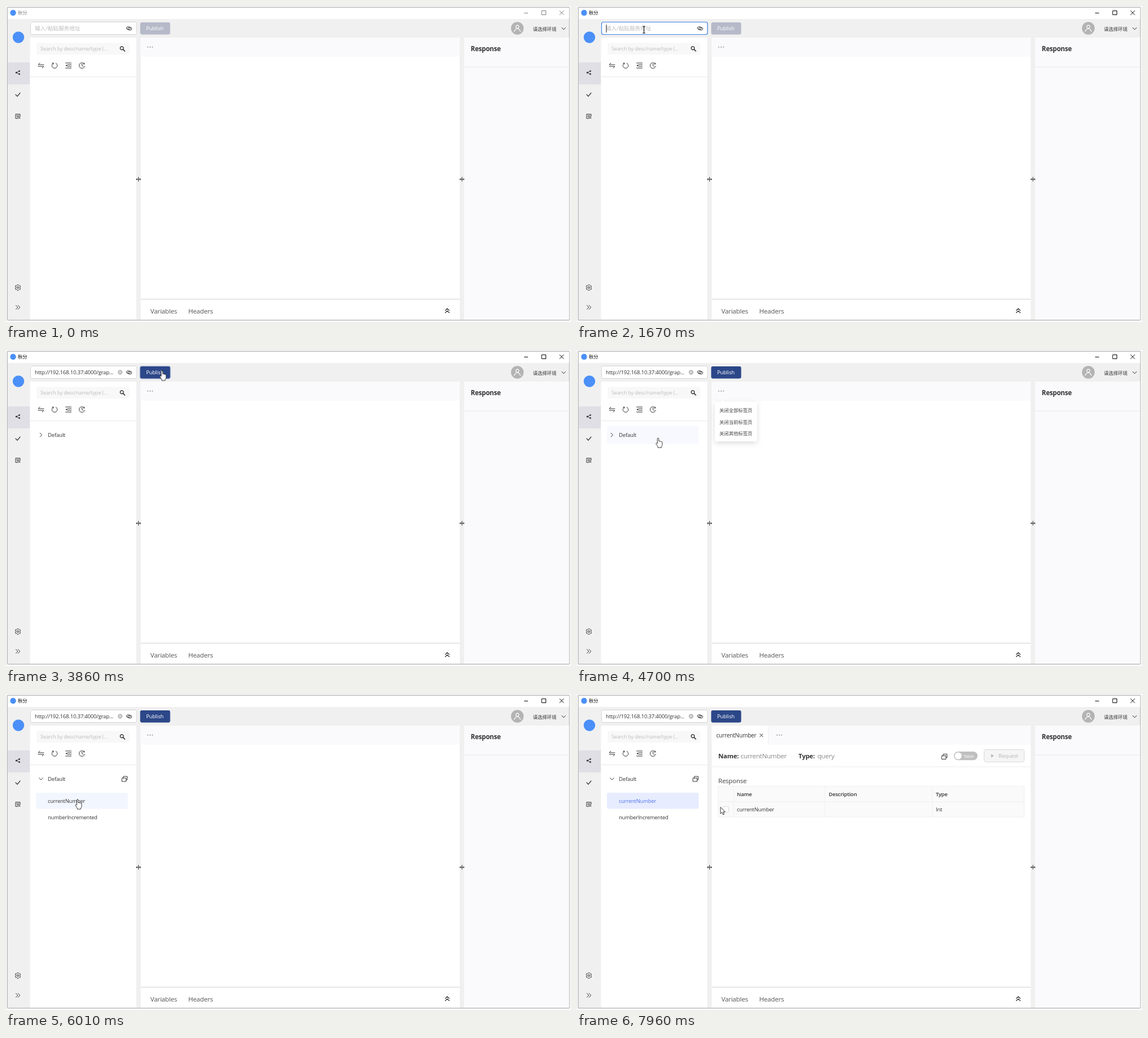
Recreate the animation shown at these times as an HTML page. Size 1000 px wide and 560 px high, loop 8000 ms.

```html
<!DOCTYPE html>
<html lang="zh-CN">
<head>
<meta charset="utf-8">
<style>
html, body { margin: 0; width: 100%; height: 100%; overflow: hidden; background: #fff; }
svg { display: block; width: 100%; height: 100%; }
text { font-family: "Open Sans", "Noto Sans CJK SC", "Noto Sans CJK", sans-serif; letter-spacing: -.02em; white-space: pre; }
.cn { letter-spacing: 0; }
.line { fill: none; stroke: #333; stroke-width: 1; stroke-linecap: round; stroke-linejoin: round; }
</style>
</head>
<body>
<svg id="stage" viewBox="0 0 1000 560"></svg>
<script>
const LOOP = 8000;
const rect = (x, y, w, h, fill, more = '') =>
  `<rect x="${x}" y="${y}" width="${w}" height="${h}" fill="${fill}" ${more}/>`;
const text = (x, mid, size, str, fill = '#333', more = '') =>
  `<text x="${x}" y="${mid + size * .36}" font-size="${size}" fill="${fill}" ${more}>${str}</text>`;
const line = (d, more = '') => `<path class="line" d="${d}" ${more}/>`;
const disc = (x, y, r, fill, more = '') => `<circle cx="${x}" cy="${y}" r="${r}" fill="${fill}" ${more}/>`;
const at = (x, y, body, id = '') => `<g ${id && `id="${id}"`} transform="translate(${x} ${y})">${body}</g>`;
const group = (id, body) => `<g id="${id}">${body}</g>`;
const CN = 'class="cn"';

const copyIcon = line('M-4.5 -1.5h7v6h-7zM-2.5 -1.5v-3h7v6h-2');
const dots = [-4, 0, 4].map(x => disc(x, 0, .75, '#444')).join('');
const grip = at(0, 0, line('M-3.5 0H3.5M0 -3.5V3.5', 'style="stroke:#555;stroke-width:1.3"') +
  '<path d="M-4.5 0l2 -2v4zM4.5 0l-2 -2v4z" fill="#555"/>');

function frame() {
  return rect(2.5, 2.5, 994.5, 554, '#f0f0f0', 'stroke="#b5b5b5" filter="url(#soft)"') +
    rect(3, 3, 993.5, 20, '#fff') +
    rect(3, 100, 39.5, 39, '#e0dfe6') +
    rect(42.5, 56, 188, 500, '#fff') +
    rect(238.5, 56, 564.5, 500, '#fff') +
    rect(238.5, 56, 564.5, 34, '#fafafc') +
    rect(811, 56, 185.5, 500, '#fafafc') +
    rect(811, 107.5, 185.5, 1, '#e9e9ed') +
    rect(42.5, 125, 188, 1, '#e8e8e8') +
    rect(238.5, 519, 564.5, 1, '#d2d2d2');
}

function titleBar() {
  return disc(12.5, 12, 5.2, '#4a90f8') +
    group('title', text(21, 12, 8.3, '秋分', '#000', CN) +
      line('M917.5 12.5h6M948.5 8.5h7v7h-7zM980 8.5l7 7M987 8.5l-7 7', 'style="stroke:#000"'));
}

function sidebar() {
  return disc(22, 55.5, 10.2, '#4a90f8') +
    at(21, 118, line('M-2.5 0L2.5 -2.7M-2.5 0L2.5 2.7') +
      disc(-2.7, 0, 1.5, '#333') + disc(2.6, -2.7, 1.4, '#333') + disc(2.6, 2.7, 1.4, '#333')) +
    at(21, 157, line('M-4 0l3 3l5 -6', 'style="stroke-width:1.2"')) +
    at(21, 195.5, line('M0 3.8h-4v-7.6h8v4M-2 -1.5h4M-2 .8h2M4 4l-1.2 -1.2') +
      disc(1.8, 1.8, 1.5, 'none', 'stroke="#333"')) +
    at(21, 499, line('M-2.2 -3.5L-1 -4.8H1L2.2 -3.5L4.2 -3V-1.2L3.6 0L4.2 1.2V3L2.2 3.5L1 4.8H-1L-2.2 3.5L-4.2 3V1.2L-3.6 0L-4.2 -1.2V-3Z') +
      disc(0, 0, 1.6, 'none', 'stroke="#333"')) +
    at(21, 534, line('M-3.5 -3.5l3.5 3.5l-3.5 3.5M.3 -3.5l3.5 3.5l-3.5 3.5'));
}

function topBar() {
  return rect(43.5, 28.5, 187.5, 22, '#fff', 'id="box" rx="3" stroke="#d6d6d6"') +
    rect(43.5, 28.5, 187.5, 22, 'none', 'id="boxOn" rx="3" stroke="#3d82ea" stroke-width="1.2"') +
    text(51, 39.5, 9.6, '输入/粘贴服务地址', '#bdbdbd', CN + ' id="hint"') +
    group('urlShort', text(51, 39.5, 9.5, 'http://192.168.10.37:4000/grap...')) +
    `<g id="urlLong" clip-path="url(#field)">${text(193.5, 39.5, 9.5, 'http://192.168.10.37:4000/graphql', '#333', 'text-anchor="end"')}</g>` +
    group('clear', disc(202, 39.5, 4.2, '#bcbcbc') +
      line('M200.5 38l3 3M203.5 38l-3 3', 'style="stroke:#fff;stroke-width:.9"')) +
    rect(51.5, 33, 1, 14, '#222', 'id="caret"') +
    at(217.8, 39.5, rect(-4.7, -2.6, 7, 4.4, 'none', 'rx="2.2" stroke="#333"') +
      rect(-2.2, -1.3, 7, 4.4, 'none', 'rx="2.2" stroke="#333"')) +
    rect(237.5, 29, 53, 21.5, 'none', 'id="wave" rx="3" stroke="#3a5bb5"') +
    rect(237.5, 29, 53, 21.5, '#b5b9c8', 'rx="3"') +
    rect(237.5, 29, 53, 21.5, '#2c4789', 'id="publish" rx="3"') +
    text(248, 39.5, 9.4, 'Publish', '#fff') +
    disc(905, 39.5, 11.2, '#b3b3b3') +
    disc(905, 36.8, 2.7, 'none', 'stroke="#fff" stroke-width="1.1"') +
    line('M899.7 45.5a5.3 5 0 0 1 10.6 0', 'style="stroke:#fff;stroke-width:1.1"') +
    text(932.5, 40.5, 8.4, '请选择环境', '#333', CN) +
    line('M983.7 38.3l3.3 3.6l3.3 -3.6');
}

function tree() {
  return rect(54, 65.5, 164.5, 20.5, '#f8f8f8', 'rx="3"') +
    text(61, 75.7, 9.05, 'Search by desc/name/type (...', '#bdbdbd') +
    at(205, 75, disc(0, -.3, 2.9, 'none', 'stroke="#222" stroke-width="1.2"') +
      line('M2.3 2l3 3', 'style="stroke:#222;stroke-width:1.5"')) +
    at(62, 105.5, line('M5 -1.5H-5l3 -3M-5 1.5H5l-3 3')) +
    at(86, 105.5, line('M-2.2 -4.3a4.8 4.8 0 1 0 4.4 0M-2.2 -4.3v2M-2.2 -4.3h-2')) +
    at(110.5, 105.5, line('M-5 -4.5H5M-1 -1.5H5M-1 1.5H5M-5 4.5H5') +
      '<path d="M-5 0l3 -2v4z" fill="#333"/>') +
    at(134.5, 105.5, line('M4 -3a5 5 0 1 0 .8 4.3M0 -3v3.2l2.3 1.3M4.3 -4.5v2h-2')) +
    rect(53, 134.5, 162.5, 32, '#f8f9fe', 'id="rootBg" rx="3"') +
    group('root', at(62, 150.5, line('M-1.8 -3.4l3.4 3.4l-3.4 3.4'), 'arrow') +
      text(74, 150.5, 9.5, 'Default')) +
    group('kids', rect(53, 175, 162.5, 28.5, '#f2f6ff', 'id="rowBg" rx="3"') +
      text(74, 189.5, 9.4, 'currentNumber', '#333', 'id="rowText"') +
      text(74, 218.3, 9.4, 'numberIncremented') + at(210, 150.5, copyIcon));
}

function detail() {
  const grid = [277, 439, 629].map(x => rect(x - .5, 164, 1, 54, '#efefef')).join('');
  return rect(238.5, 56, 99.5, 34, '#fff') + rect(338, 56, 1, 34, '#efeff1') +
    text(246.5, 73.3, 10.1, 'currentNumber', '#333') + line('M323.7 70.5l5.4 5.4M329.1 70.5l-5.4 5.4') +
    text(250, 109.7, 11.4, 'Name:', '#333', 'font-weight="700"') +
    text(289.5, 109.7, 11.6, 'currentNumber', '#888') +
    text(392, 109.7, 11.4, 'Type:', '#333', 'font-weight="700"') +
    text(425.5, 109.7, 11.6, 'query', '#888') +
    at(650.5, 111, copyIcon) +
    rect(667, 102, 42, 15.2, '#bfbfbf', 'rx="7.6"') + disc(674.7, 109.6, 6.2, '#fff') +
    text(684, 110, 7.9, 'Table', '#fff') +
    rect(720.5, 98.5, 71, 22, '#f5f5f5', 'rx="3" stroke="#d9d9d9"') +
    '<path d="M733 106.5l5 3l-5 3z" fill="#b8b8b8"/>' +
    text(746, 109.7, 9.5, 'Request', '#b8b8b8') +
    rect(238.5, 128.5, 564.5, 1, '#eee') +
    text(250, 154, 11.5, 'Response', '#444') +
    rect(250, 163.5, 541.5, 27.5, '#fafafa') +
    rect(250, 191, 541.5, 27, '#fafafa', 'id="cells"') +
    rect(250, 190.5, 541.5, 1, '#efefef') + grid +
    rect(250, 163.5, 541.5, 54.5, 'none', 'stroke="#efefef"') +
    [[283, 'Name'], [445.5, 'Description'], [635, 'Type']]
      .map(([x, s]) => text(x, 177.5, 9.4, s, '#333', 'font-weight="600"')).join('') +
    rect(258.5, 199.5, 10, 10, '#fff', 'rx="1" stroke="#d9d9d9"') +
    text(283, 204.5, 9.4, 'currentNumber') + text(635, 204.5, 9.4, 'Int');
}

function popup() {
  return `<g id="popup"><g filter="url(#lift)">${rect(244, 92, 74.5, 70, '#fff', 'rx="3.5"')}</g>
    <path d="M253 92.5l4.7 -4.3l4.7 4.3z" fill="#fff"/>` +
    ['关闭全部标签页', '关闭当前标签页', '关闭其他标签页']
      .map((s, i) => text(252, 107 + i * 20.6, 8.35, s, '#444', CN)).join('') + '</g>';
}

function pointers() {
  const skin = 'fill="#fff" stroke="#222" stroke-width=".9" stroke-linejoin="round"';
  return at(0, 0,
    `<path id="arrowTip" d="M0 0V11.6L2.7 9.1L4.6 13.4L6.5 12.6L4.7 8.4H8.3Z" ${skin}/>` +
    `<path id="hand" d="M-1.2 1.2Q-1.2 0 0 0Q1.3 0 1.3 1.2V5.6Q2.7 4.8 3.6 6Q5 5.4 5.7 6.6Q7.4 6.3 7.4 8V11.6Q7.4 14 5.8 15.2V17H-.3V15.4L-3.4 10.6Q-4 9.4 -3 8.8Q-2.2 8.6 -1.2 9.8Z" ${skin}/>` +
    '<path id="beam" d="M-2.5 -6H-.6L0 -5.4L.6 -6H2.5M0 -5.4V5.4M-2.5 6H-.6L0 5.4L.6 6H2.5" fill="none" stroke="#111" stroke-width="1.1"/>',
    'pointer');
}

const stage = document.getElementById('stage');
stage.innerHTML = `<defs>
  <clipPath id="field"><rect x="51" y="30" width="145" height="19"/></clipPath>
  <filter id="soft" x="-2%" y="-2%" width="104%" height="104%"><feDropShadow dx="0" dy="0" stdDeviation="1" flood-opacity=".3"/></filter>
  <filter id="lift" x="-30%" y="-30%" width="160%" height="170%"><feDropShadow dx="0" dy="3" stdDeviation="5" flood-opacity=".14"/></filter>
</defs>` + frame() + titleBar() + sidebar() + topBar() + tree() +
  text(822.5, 75.7, 11.6, 'Response', '#333', 'font-weight="700"') +
  text(255.5, 540.7, 11.6, 'Variables', '#555') + text(322.5, 540.7, 11.6, 'Headers', '#555') +
  line('M777.5 539.5l3.5 -3.3l3.5 3.3M777.5 543.5l3.5 -3.3l3.5 3.3', 'style="stroke-width:1.2"') +
  at(234.5, 307, grip) + at(807, 307, grip) +
  group('detail', detail()) + at(0, 0, dots, 'more') + popup() + pointers();

const el = {};
stage.querySelectorAll('[id]').forEach(n => el[n.id] = n);
const set = (id, name, value) => el[id].setAttribute(name, value);
const fade = (id, o) => set(id, 'opacity', +o);
const ramp = (t, a, b) => Math.min(1, Math.max(0, (t - a) / (b - a)));

// Bursts of screen updates: start, end, count
const bursts = [[330, 1100, 12], [1170, 1670, 8], [2070, 2070, 1], [2330, 2540, 4], [2740, 3170, 7],
  [3310, 4060, 12], [4130, 4910, 12], [4980, 5050, 2], [5250, 6010, 12], [6340, 6540, 3], [7200, 7960, 12]];

function stepped(t) {
  const burst = bursts.filter(b => t >= b[0]).pop();
  if (!burst) return 0;
  const [start, end, count] = burst;
  const gap = (end - start) / (count - 1) || 1;
  return start + gap * Math.min(count - 1, Math.floor((t - start) / gap + .1));
}

// Pointer path: time, x, y
const path = [[330, 955, 542], [560, 560, 335], [800, 180, 120], [960, 75, 72], [1100, 68, 63],
  [1170, 84, 56], [1380, 118.5, 42], [2740, 118.5, 42], [2810, 140, 42], [3027, 252, 40], [3170, 288, 38],
  [3310, 288, 38], [3480, 276, 37], [4060, 276, 37], [4270, 255, 70], [4480, 195, 122], [4697, 143.5, 156],
  [4910, 131.5, 155], [5050, 124.5, 148], [5450, 124.5, 148], [5860, 126.5, 187], [7200, 126.5, 187],
  [7340, 170, 200], [7430, 225, 215], [7620, 285, 222], [7800, 258, 205], [7900, 254, 200.5]];

function pointerAt(t) {
  const i = path.findIndex(p => p[0] > t);
  if (i < 0) return path[path.length - 1].slice(1);
  if (i === 0) return path[0].slice(1);
  const [a, b] = [path[i - 1], path[i]];
  const k = ramp(t, a[0], b[0]);
  return [a[1] + (b[1] - a[1]) * k, a[2] + (b[2] - a[2]) * k];
}

function draw(time) {
  const t = stepped(time);
  const [x, y] = pointerAt(t);
  const over = (l, top, r, b) => x >= l && x <= r && y >= top && y <= b;
  const pasted = t >= 2330, listed = t >= 3720, open = t >= 5250, chosen = t >= 6340;
  const focus = ramp(t, 1430, 1600) * (1 - ramp(t, 3515, 3700));

  fade('title', t >= 1400 ? 1 : .5);
  fade('boxOn', focus);
  fade('hint', !pasted);
  fade('urlLong', pasted && t < 3515);
  fade('urlShort', t >= 3515);
  fade('clear', pasted);
  fade('caret', t >= 1450 && t < 2070);
  fade('publish', ramp(t, 2270, 2540));
  const wave = ramp(t, 3500, 4060);
  fade('wave', t >= 3500 ? .55 * (1 - wave) : 0);
  set('wave', 'stroke-width', 5 * wave);

  fade('root', listed);
  fade('rootBg', listed && over(53, 134, 216, 167));
  set('arrow', 'transform', `translate(62 150.5) rotate(${90 * ramp(t, 5190, 5400)})`);
  fade('kids', open ? ramp(t, 5190, 5460) : 0);
  fade('rowBg', chosen || over(53, 175, 216, 204));
  set('rowBg', 'fill', chosen ? '#e7ecff' : '#f2f6ff');
  set('rowText', 'fill', chosen ? '#4d74e8' : '#333');

  fade('detail', chosen);
  fade('cells', over(250, 191, 792, 222));
  set('more', 'transform', `translate(${chosen ? 358 : 255} 72.7)`);

  const pop = ramp(t, 4330, 4480) * (1 - ramp(t, 4740, 4900));
  fade('popup', pop);
  set('popup', 'transform', `translate(0 ${90 * .2 * (1 - pop)}) scale(1 ${.8 + .2 * pop})`);

  const inBox = over(43, 28, 231, 51);
  const onLink = over(237, 28, 291, 51) || (listed && over(53, 134, 216, 232));
  fade('pointer', t >= 330);
  fade('beam', inBox);
  fade('hand', onLink);
  fade('arrowTip', !inBox && !onLink);
  set('pointer', 'transform', `translate(${x} ${y})`);
}

function tick() {
  draw(performance.now() % LOOP);
  requestAnimationFrame(tick);
}
tick();
</script>
</body>
</html>
```
